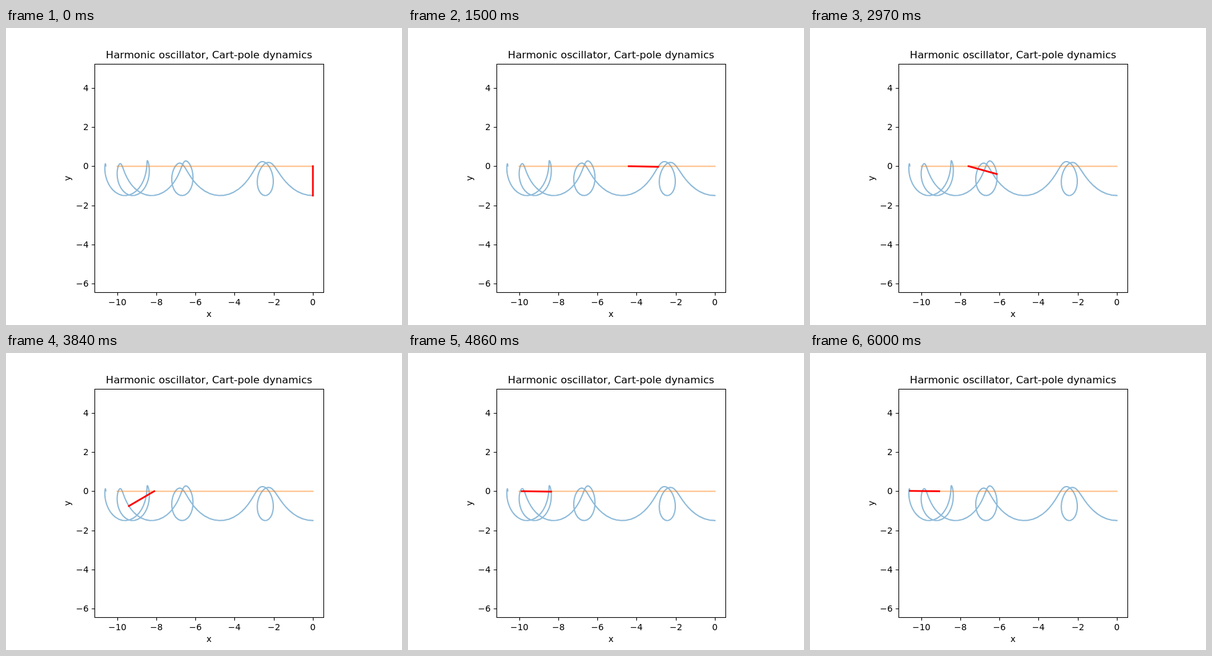
These frames come from a looping animation (640 by 480 pixels, 6.03 s). An HTML page:

```html
<!DOCTYPE html>
<html lang="en">
<head>
<meta charset="utf-8">
<title>Cart-pole</title>
<style>
  html, body { margin: 0; width: 100%; height: 100%; overflow: hidden; background: #fff; }
  svg { display: block; width: 640px; height: 480px; }
  text { font: 13.89px "DejaVu Sans", sans-serif; text-anchor: middle; }
  .title { font-size: 16.67px; }
  .tick { text-anchor: end; }
  .axes { fill: none; stroke: #000; stroke-width: 1.11; }
  .curve { fill: none; stroke-width: 2.08; stroke-linecap: square; stroke-linejoin: round; stroke-opacity: .5; }
  #pole { stroke: #f00; stroke-width: 2.78; stroke-linecap: square; }
</style>
</head>
<body>
<svg viewBox="0 0 640 480">
  <path id="trace" class="curve" stroke="#1f77b4"/>
  <path id="track" class="curve" stroke="#ff7f0e"/>
  <line id="pole"/>
  <rect class="axes" x="143.5" y="58.5" width="370" height="369"/>
  <path id="ticks" class="axes"/>
  <g id="labels">
    <text class="title" x="328.2" y="49">Harmonic oscillator, Cart-pole dynamics</text>
    <text x="328" y="467">x</text>
    <text transform="translate(103.5 243) rotate(-90)">y</text>
  </g>
</svg>
<script>
const STEP_MS = 30, STEPS = 201;
const X0 = 496, Y0 = 223.35, UNIT = 31.65, LENGTH = 1.5 * UNIT;
const get = id => document.getElementById(id);

// Slow drift of the whole system plus the pole's swing, which pushes the cart back.
const SWING = 97.9, HALF_SWING = 30.33, TILT = 3.1;
const DRIFT = 303.8, DRIFT_RATE = 0.00848, MASS_RATIO = 0.3;

function pose(n) {
  const drift = Math.sin(DRIFT_RATE * n);
  const phase = Math.PI * n / HALF_SWING;
  const angle = (TILT * drift - SWING * Math.sin(phase)) * Math.PI / 180;
  const reach = LENGTH * Math.sin(angle);
  const cart = X0 - DRIFT * drift - MASS_RATIO * reach;
  return { cart, x: cart + reach, y: Y0 + LENGTH * Math.cos(angle) };
}

const poses = Array.from({ length: STEPS }, (_, n) => pose(n));
const pathOf = points => "M" + points.map(p => p.map(v => v.toFixed(2)).join(" ")).join("L");

get("trace").setAttribute("d", pathOf(poses.map(p => [p.x, p.y])));
get("track").setAttribute("d", pathOf([[X0, 223.5], [Math.min(...poses.map(p => p.cart)), 223.5]]));

function addLabel(value, x, y, cls) {
  const label = document.createElementNS("http://www.w3.org/2000/svg", "text");
  label.textContent = String(value).replace("-", "\u2212");
  label.setAttribute("x", x);
  label.setAttribute("y", y);
  if (cls) label.setAttribute("class", cls);
  get("labels").append(label);
}

let ticks = "";
for (let v = -10; v <= 0; v += 2) {
  const x = Math.round(X0 + v * 31.63);
  ticks += `M${x + 0.5} 428v4.5`;
  addLabel(v, x, 448);
}
for (let v = -6; v <= 4; v += 2) {
  const y = Math.round(Y0 - v * UNIT);
  ticks += `M143 ${y + 0.5}h-4.5`;
  addLabel(v, 133.5, y + 5, "tick");
}
get("ticks").setAttribute("d", ticks);

const pole = get("pole");
function draw(now) {
  const { cart, x, y } = poses[Math.floor(now / STEP_MS) % STEPS];
  pole.setAttribute("x1", cart);
  pole.setAttribute("y1", Y0);
  pole.setAttribute("x2", x);
  pole.setAttribute("y2", y);
}

let start;
function loop(now) {
  start ??= now;
  draw(Math.max(0, now - start));
  requestAnimationFrame(loop);
}
draw(0);
requestAnimationFrame(loop);
</script>
</body>
</html>
```
